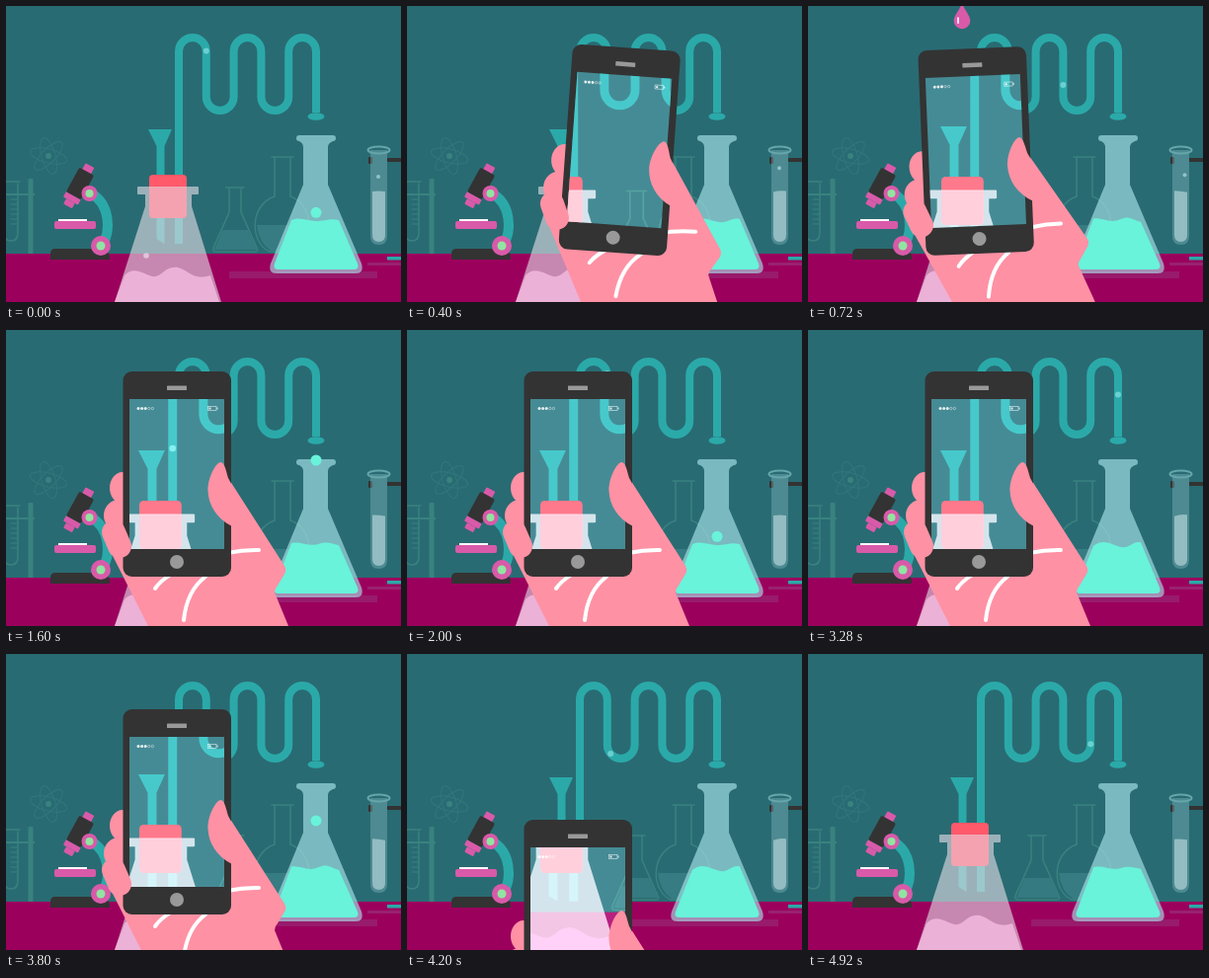
Animation, 400 px wide and 300 px high, one loop 5000 ms. Source, as an HTML page with a canvas:

```html
<!DOCTYPE html>
<html lang="en">
<head>
<meta charset="utf-8">
<title>Laboratory</title>
<style>
html, body { margin: 0; width: 100%; height: 100%; overflow: hidden; background: #296b73; }
canvas { display: block; }
</style>
</head>
<body>
<canvas id="stage" width="400" height="300"></canvas>
<script>
const ctx = document.getElementById('stage').getContext('2d');
const LOOP = 5000, STEP = 40, LAST = 4920;
const WALL = '#296b73', TABLE = '#9b005d', TEAL = '#2ba9a9', FAINT = '#38827f';
const DARK = '#333333', PINK = '#d95aa9', GREEN = '#90e5a0', MINT = '#68f3da';
const RED = '#ff444b', SKIN = '#ff91a4';
const MINT_GLASS = 'rgba(172,232,238,.62)', PINK_GLASS = 'rgba(225,220,228,.62)';

const shape = (d, color) => { ctx.fillStyle = color; ctx.fill(new Path2D(d)); };
function line(d, color, width, cap = 'round') {
  ctx.strokeStyle = color;
  ctx.lineWidth = width;
  ctx.lineCap = cap;
  ctx.stroke(new Path2D(d));
}
function box(x, y, w, h, color, r = 0) {
  ctx.fillStyle = color;
  ctx.beginPath();
  ctx.roundRect(x, y, w, h, r);
  ctx.fill();
}
function oval(x, y, rx, ry, color) {
  ctx.fillStyle = color;
  ctx.beginPath();
  ctx.ellipse(x, y, rx, ry, 0, 0, Math.PI * 2);
  ctx.fill();
}
const dot = (x, y, r, color) => oval(x, y, r, r, color);
function placed(x, y, angle, draw) {
  ctx.save();
  ctx.translate(x, y);
  ctx.rotate(angle);
  draw();
  ctx.restore();
}
const clamp = v => Math.max(0, Math.min(1, v));

// Smooth curve through [time, value] pairs.
function track(keys, t) {
  if (t <= keys[0][0]) return keys[0][1];
  const n = keys.length - 1;
  if (t >= keys[n][0]) return keys[n][1];
  const i = keys.findIndex(k => k[0] > t) - 1;
  const slope = j => {
    if (j <= 0 || j >= n) return 0;
    return (keys[j + 1][1] - keys[j - 1][1]) / (keys[j + 1][0] - keys[j - 1][0]);
  };
  const [t0, a] = keys[i], [t1, b] = keys[i + 1];
  const d = t1 - t0, u = (t - t0) / d, v = 1 - u;
  return v * v * (1 + 2 * u) * a + u * v * v * d * slope(i)
    + u * u * (3 - 2 * u) * b - u * u * v * d * slope(i + 1);
}

// The coil: a riser followed by alternating bends of equal radius.
const COIL = { x: 175, gap: 27.8, top: 46, low: 92, base: 171, mouth: 108 };
const BEND = COIL.gap / 2;
function coilPath() {
  let d = `M${COIL.x} 241V${COIL.top}`;
  for (let i = 1; i <= 5; i++) {
    const y = i % 2 ? COIL.top : COIL.low;
    const end = i === 5 ? COIL.mouth : i % 2 ? COIL.low : COIL.top;
    d += `A${BEND} ${BEND} 0 0 ${i % 2} ${COIL.x + i * COIL.gap} ${y}V${end}`;
  }
  return d;
}
const coil = coilPath();

function coilPoint(s) {
  const riser = COIL.base - COIL.top, arc = Math.PI * BEND, run = COIL.low - COIL.top;
  if (s < riser) return [COIL.x, COIL.base - s];
  s -= riser;
  for (let i = 0; i < 5; i++) {
    const over = i % 2 === 0, x = COIL.x + i * COIL.gap;
    if (s < arc) {
      const a = s / BEND, y = over ? COIL.top : COIL.low;
      return [x + BEND - BEND * Math.cos(a), y + (over ? -1 : 1) * BEND * Math.sin(a)];
    }
    s -= arc;
    if (s < run || i === 4) return [x + COIL.gap, over ? COIL.top + s : COIL.low - s];
    s -= run;
  }
}

function backdrop() {
  box(-20, -20, 440, 271, WALL);
  for (let i = 0; i < 3; i++) {
    placed(43, 152, .25 + i * Math.PI / 3, () => {
      ctx.beginPath();
      ctx.ellipse(0, 0, 19, 7, 0, 0, Math.PI * 2);
      ctx.strokeStyle = '#31777c';
      ctx.lineWidth = 1;
      ctx.stroke();
    });
  }
  dot(43, 152, 3, FAINT);

  line('M-4 178H14M-2 180V230Q-2 238 5 238Q12 238 12 230V180', FAINT, 1.5);
  for (let y = 196; y < 226; y += 5) line(`M5 ${y}H11`, FAINT, 1);
  box(0, 190, 29, 2, FAINT);
  box(22.5, 175, 5, 80, FAINT, 1);

  line('M223 184H241M226 185V209L210 245Q209 249 213 249H252Q256 249 254 245L238 209V185', FAINT, 1.5);
  shape('M219 227H245L254 247H211Z', 'rgba(75,150,153,.35)');
  line('M269 153H291M272 154V193C246 202 247 240 267 249H293C312 240 313 202 288 193V154', FAINT, 1.5);
  shape('M254 222H305Q304 240 292 248H268Q256 240 254 222Z', 'rgba(75,150,153,.4)');

  box(-20, 251, 440, 69, TABLE);
  box(226, 269, 150, 7, 'rgba(150,55,125,.5)');
  box(366, 260, 54, 3, 'rgba(150,55,125,.6)');
  box(386, 254, 34, 3.5, TEAL);
}

function microscope() {
  line('M86 190C105 200 107 228 97 243', TEAL, 10);
  shape('M45 257V251Q45 246 50 246H98Q105 247 105 257Z', DARK);
  box(49, 218, 42, 8, PINK, 2);
  box(53, 216, 29, 2, '#fff');
  placed(75, 180, .5, () => {
    box(-5, -21, 10, 8, PINK, 1);
    box(-8.5, -14, 17, 28, DARK, 2);
    box(-8.5, 14, 17, 6, PINK, 1);
    box(-5, 20, 10, 6, PINK, 1);
  });
  dot(84.5, 190, 8, PINK);
  dot(84.5, 190, 4, GREEN);
  dot(96, 243, 10, PINK);
  dot(96, 243, 4.5, GREEN);
}

function testTube(t) {
  const wave = .7 * Math.sin(t * Math.PI * 2);
  box(386, 154, 34, 4, DARK);
  box(367, 153, 4, 7, DARK, 1);
  shape('M369 146V233Q369 242 377.5 242Q386 242 386 233V146Z', 'rgba(150,200,205,.33)');
  shape(`M371 ${188 + wave}Q377 ${187 - wave} 384 ${188 - wave}V232Q384 239 377.5 239Q371 239 371 232Z`, '#92bcc1');
  ctx.beginPath();
  ctx.ellipse(377.5, 146, 11, 3.5, 0, 0, Math.PI * 2);
  ctx.strokeStyle = '#65a6ab';
  ctx.lineWidth = 2;
  ctx.stroke();
  if (t < .5) dot(377, 173 - 22 * t, 2, '#8fc3c7');
  else if (t < 1.1) dot(381.5, 187 - 22 * t, 2, '#8fc3c7');
}

function greenFlask(t) {
  const fall = (t + .56) % 2;
  const wave = 1.8 * Math.sin(t * Math.PI * 2);
  shape('M297 131H331Q334 131 334 134Q334 137 331 137Q326 139 326 143V181L360 261Q363 271 354 271H274Q265 271 268 261L301 181V143Q301 139 297 137Q294 137 294 134Q294 131 297 131Z', MINT_GLASS);
  shape(`M289 ${217 + wave}C300 ${213 - wave} 306 ${219 - wave} 316 ${218 + wave}S328 ${215 - wave} 337 ${217 - wave}L356 261Q358 267 352 267H276Q270 267 272 261Z`, MINT);
  if (fall < .6) dot(314, 108 + 24 * (fall / .16) ** 1.15, 5.5 * clamp(fall / .1), MINT);
}

function pinkDrop(t) {
  const age = t - .44;
  if (age < 0 || age % 2 > .6) return;
  const a = age % 2;
  const tip = 295 * a * a + 7000 * Math.max(0, a - .35) ** 2;
  if (tip > 148) return;
  ctx.save();
  ctx.beginPath();
  ctx.rect(140, -40, 32, 167);
  ctx.clip();
  placed(156, tip, 0, () => {
    shape('M0 -27C2 -19 8.3 -14 8.3 -8A8.3 8 0 0 1 -8.3 -8C-8.3 -14 -2 -19 0 -27Z', PINK);
    line('M-4 -11V-6', '#fff', 1.6);
  });
  ctx.restore();
}

function pinkFlask(t, glass) {
  box(145, 171, 38, 44, '#ff596a', 4);
  shape('M133 184Q133 183 134 183H194Q195 183 195 184V190Q195 191 194 191H188V203L218 300L222 320H106L110 300L141 203V191H134Q133 191 133 190Z', glass);
  box(145, 184, 38, 31, 'rgba(255,150,165,.4)', [0, 0, 4, 4]);
  shape('M120 273C130 263 139 272 148 274C158 276 160 263 174 265C184 267 190 279 207 273L216 300L221 320H106L110 300Z', '#ecb1d6');
  if (t < .3) dot(142, 253 - 35 * t, 2.8, '#e3c2db');
}

function scene(t, glass) {
  backdrop();
  microscope();
  testTube(t);
  greenFlask(t);
  pinkDrop(t);
  line(coil, TEAL, 8, 'butt');
  oval(314, 112, 8.5, 3.8, TEAL);
  const [x, y] = coilPoint(((t + .566) % 2.005) * 297);
  dot(x, y, 3, '#6bcfd0');
  shape('M144 125H168L160.5 142V241L152.5 236V142Z', TEAL);
  pinkFlask(t, glass);
}

// Two slanted halves meet across the screen and part again.
function shutter(t) {
  const closed = Math.min(clamp((t - 2.42) / .26), clamp((3.04 - t) / .26));
  if (!closed) return;
  const gap = 94 * (1 - closed), rise = 18.3;
  const up = 146.5 - gap, low = 146.5 + gap;
  shape(`M125 -60H221V${up + rise}L125 ${up - rise}Z`, RED);
  shape(`M125 360H221V${low + rise}L125 ${low - rise}Z`, RED);
}

function statusBar() {
  const ink = 'rgba(255,255,255,.85)';
  for (let i = 0; i < 5; i++) {
    if (i < 3) {
      dot(134 + i * 3.6, 79.5, 1.5, ink);
    } else {
      ctx.beginPath();
      ctx.arc(134 + i * 3.6, 79.5, 1.2, 0, Math.PI * 2);
      ctx.strokeStyle = ink;
      ctx.lineWidth = .5;
      ctx.stroke();
    }
  }
  ctx.strokeStyle = ink;
  ctx.lineWidth = .6;
  ctx.strokeRect(204.5, 77.5, 8.5, 4);
  box(205.5, 78.5, 2, 2, ink);
  box(213.5, 78.5, 1, 2, ink);
}

function phonePose(t) {
  return {
    x: track([[.02, 300], [.2, 180], [.4, 42], [.56, 3], [.7, -3], [.98, 0]], t),
    y: track([[.02, 240], [.2, 75], [.4, 0], [.56, 0], [.72, 1], [.98, 0]], t)
      + 350 * Math.max(0, t - 3.6) ** 2,
    angle: track([[.02, 25], [.2, 14], [.4, 4.1], [.56, -.8], [.7, -2.4], [1, 0]], t) * Math.PI / 180
  };
}

function posed(pose, draw) {
  placed(173 + pose.x, 146 + pose.y, pose.angle, () => {
    ctx.translate(-173, -146);
    draw();
  });
}

function palm() {
  oval(118, 160, 13, 16, SKIN);
  oval(114, 188, 15, 16, SKIN);
  shape('M99 211L144 300L205 430H335L286 300L272 266Q272 262 275 259L281 249Q285 244 282 239L225 150L120 160Z', SKIN);
  line('M256 223C216 222 164 243 151 262', '#fff', 4);
  line('M180 294C182 275 190 259 202 250', '#fff', 4);
}

function fingertips() {
  line('M109 205L115 219', SKIN, 24);
  shape('M217 134C211 136 204 152 204.5 163C205 177 213 191 229 199L258 211L225 150C223 143 221 133 217 134Z', SKIN);
}

function phone(t, pose) {
  posed(pose, () => {
    palm();
    box(118.5, 42, 109.5, 208, DARK, 9);
    box(163, 56.5, 20, 4.5, '#999', .5);
    dot(173, 235, 7, '#999');
  });

  ctx.save();
  posed(pose, () => {
    ctx.beginPath();
    ctx.rect(125, 70, 96, 152);
  });
  ctx.clip();
  // The live view is slightly magnified and stays still while the phone moves.
  ctx.save();
  ctx.translate(148, 122);
  ctx.scale(1.12, 1.11);
  ctx.translate(-156.5, -125);
  scene(t, 'rgba(240,230,236,.72)');
  ctx.restore();
  ctx.globalCompositeOperation = 'lighter';
  box(0, 0, 400, 300, '#1c2022');
  ctx.restore();

  posed(pose, () => {
    ctx.save();
    ctx.beginPath();
    ctx.rect(125, 70, 96, 152);
    ctx.clip();
    shutter(t);
    statusBar();
    ctx.restore();
    fingertips();
  });
}

function frame() {
  const now = performance.now() % LOOP;
  const t = Math.min(LAST, Math.floor(now / STEP) * STEP) / 1000;
  scene(t, PINK_GLASS);
  if (t > .02 && t < 4.5) phone(t, phonePose(t));
  requestAnimationFrame(frame);
}
frame();
</script>
</body>
</html>
```
